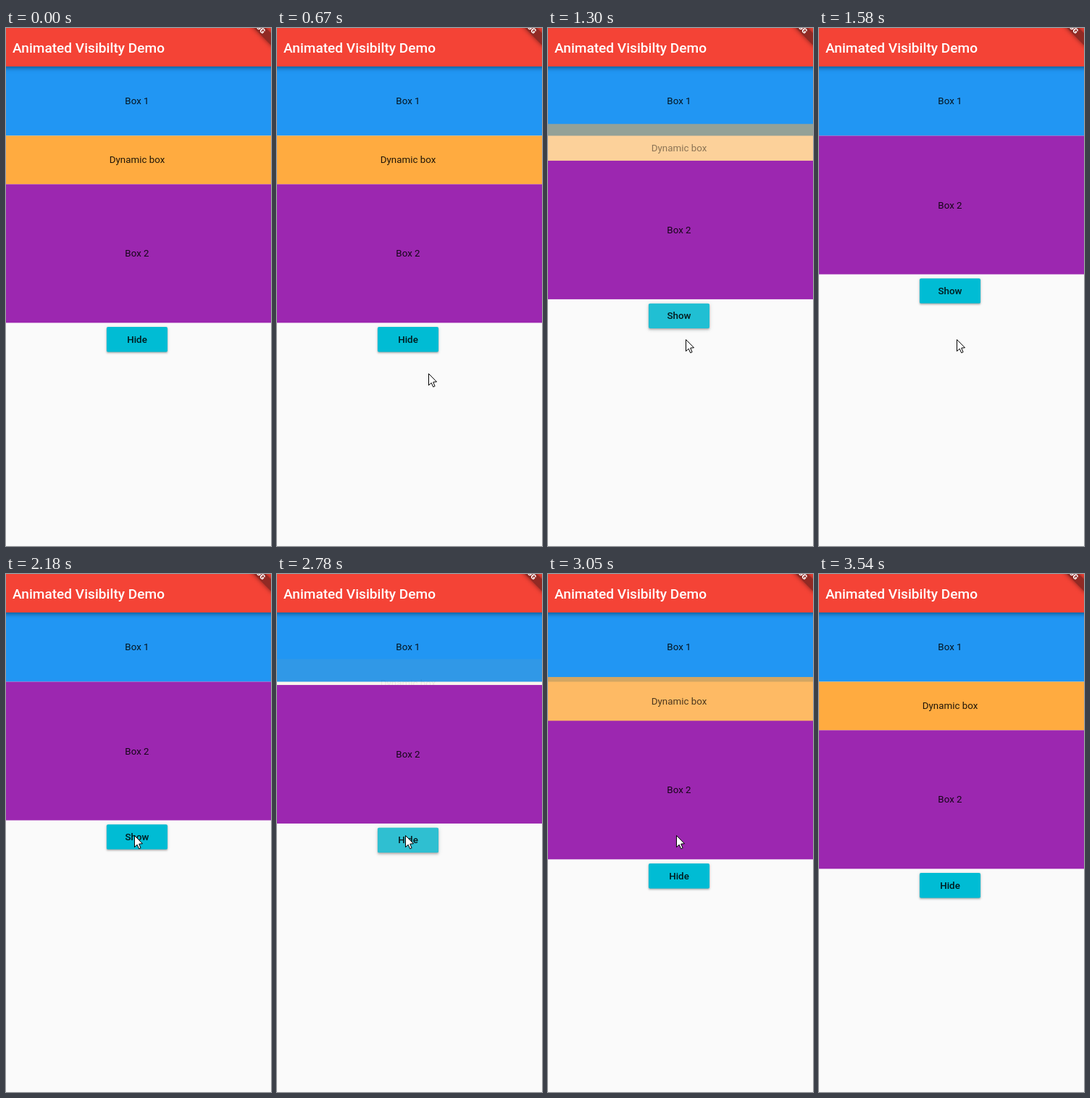
An HTML page with a canvas for the animation above (4600 ms loop, 366 by 714 pixels).

```html
<!DOCTYPE html>
<html lang="en">
<head>
<meta charset="utf-8">
<title>Animated Visibilty Demo</title>
<style>
  html, body { margin: 0; width: 100%; height: 100%; overflow: hidden; background: #fafafa; }
  canvas { display: block; width: 366px; height: 714px; }
</style>
</head>
<body>
<canvas id="stage"></canvas>
<script>
const W = 366, H = 714, LOOP = 4600;
const S = 0.955;             // stage pixels per layout unit
const CX = 181;
const BAR = 53, BLUE = 100 * S, DYN = 70 * S, PURPLE = 200 * S;
const INK = 'rgba(0,0,0,0.87)';

const HIDE = { press: 1020, start: 1089, time: 430, x: 189.5, y: 18 };
const SHOW = { press: 2550, start: 2702, time: 495, x: 177.5, y: 16 };

// The picture refreshes about every 70 ms within these spans and rests between them.
const BURSTS = [[260, 740], [810, 1300], [1370, 1580], [1980, 2180], [2650, 3120], [3190, 3540]];

// Pointer glides: start, end, and where it arrives
const ENTRY = { x: 316, y: 695 };
const GLIDES = [
  { from: 200, to: 780, x: 199, y: 456 },
  { from: 740, to: 900, x: 190, y: 429 },
  { from: 1910, to: 2180, x: 177, y: 360 },
  { from: 3120, to: 3500, x: 240, y: 690 },
];

const canvas = document.getElementById('stage');
const ctx = canvas.getContext('2d');
const dpr = window.devicePixelRatio || 1;
canvas.width = W * dpr;
canvas.height = H * dpr;

const clamp = u => Math.min(1, Math.max(0, u));
const ramp = (t, start, time) => (1 - Math.cos(Math.PI * clamp((t - start) / time))) / 2;

function refreshTime(t) {
  const slack = 5;
  const burst = BURSTS.findLast(([a]) => a <= t + slack);
  if (!burst) return 0;
  const [a, b] = burst;
  const steps = Math.round((b - a) / 70);
  const step = (b - a) / steps;
  return a + step * Math.min(steps, Math.floor((t - a + slack) / step));
}

function rect(x, y, w, h, color) {
  ctx.fillStyle = color;
  ctx.fillRect(x, y, w, h);
}

function text(str, x, cy, size, weight, color, align = 'center') {
  ctx.font = `${weight} ${size * S}px Roboto, sans-serif`;
  ctx.textAlign = align;
  ctx.fillStyle = color;
  ctx.fillText(str, x, cy + size * S * 0.342);
}

function shadow(x, y, w, h, e) {
  const layers = [[e / 2, e, -e / 4, 0.2], [e, e * 1.25, 0, 0.14], [e / 4, e * 2.5, 0, 0.12]];
  for (const [dy, blur, spread, alpha] of layers) {
    const g = spread * S;
    ctx.filter = `blur(${blur * S * dpr / 2}px)`;
    rect(x - g, y + dy * S - g, w + 2 * g, h + 2 * g, `rgba(0,0,0,${alpha})`);
  }
  ctx.filter = 'none';
}

function drawBar() {
  shadow(-40, -40, W + 80, BAR + 40, 4);
  rect(0, 0, W, BAR, '#f44336');
  text('Animated Visibilty Demo', 9, 27, 20, 500, '#fff', 'left');
}

function drawBanner() {
  const y = 28 * S, h = 12 * S, half = 40 * S;
  ctx.save();
  ctx.translate(368.5, -28);
  ctx.rotate(Math.PI / 4);
  ctx.filter = `blur(${3 * dpr}px)`;
  rect(-half, y, 2 * half, h, 'rgba(0,0,0,0.5)');
  ctx.filter = 'none';
  rect(-half, y, 2 * half, h, 'rgb(145,42,36)');
  text('DEBUG', 0, y + h / 2, 10.2, 900, '#fff');
  ctx.restore();
}

function drawButton(top, t) {
  const w = 88 * S, h = 36 * S, x = CX - w / 2;
  const tap = t < SHOW.press ? HIDE : SHOW;
  const age = Math.max(0, t - tap.press);
  const radius = 18 * (age / 140) ** 2;
  const alpha = age ? 0.4 * clamp(1 - (age - 140) / 230) : 0;

  shadow(x, top, w, h, 2 + 3 * alpha);
  ctx.save();
  ctx.beginPath();
  ctx.roundRect(x, top, w, h, 2 * S);
  ctx.fillStyle = '#00bcd4';
  ctx.fill();
  if (alpha > 0) {
    ctx.clip();
    ctx.beginPath();
    ctx.arc(tap.x, top + tap.y, radius, 0, 2 * Math.PI);
    ctx.fillStyle = `rgba(200,200,200,${alpha})`;
    ctx.fill();
  }
  ctx.restore();
  const label = t >= HIDE.start && t < SHOW.start ? 'Show' : 'Hide';
  text(label, CX, top + h / 2, 14, 500, INK);
}

function drawPointer(t) {
  if (t < 260 || t >= 3540) return;
  let { x, y } = ENTRY;
  for (const g of GLIDES) {
    const u = ramp(t, g.from, g.to - g.from);
    x += (g.x - x) * u;
    y += (g.y - y) * u;
  }
  const outline = [[0, 0], [0, 16], [3.7, 12.6], [6.2, 18.2], [8.6, 17.2], [6.2, 11.6], [11, 11.2]];
  ctx.beginPath();
  for (const [dx, dy] of outline) ctx.lineTo(Math.round(x) + 0.5 + dx, Math.round(y) + 0.5 + dy);
  ctx.closePath();
  ctx.fillStyle = '#fff';
  ctx.fill();
  ctx.strokeStyle = '#000';
  ctx.lineWidth = 1;
  ctx.stroke();
}

function draw(t) {
  const shown = 1 - ramp(t, HIDE.start, HIDE.time) + ramp(t, SHOW.start, SHOW.time);
  const dynTop = BAR + BLUE;
  const purpleTop = dynTop + DYN * shown;
  ctx.setTransform(dpr, 0, 0, dpr, 0, 0);
  rect(0, 0, W, H, '#fafafa');

  rect(0, BAR, W, BLUE, '#2196f3');
  text('Box 1', CX, BAR + BLUE / 2, 14, 400, INK);

  // The full-height box stays centred in its shrinking slot and overlaps upwards.
  const y = dynTop - DYN * (1 - shown) / 2;
  ctx.globalAlpha = shown;
  rect(0, y, W, DYN, '#ffab40');
  text('Dynamic box', CX, y + DYN / 2, 14, 400, INK);
  ctx.globalAlpha = 1;

  rect(0, purpleTop, W, PURPLE, '#9c27b0');
  text('Box 2', CX, purpleTop + PURPLE / 2, 14, 400, INK);

  drawButton(purpleTop + PURPLE + 6 * S, t);
  drawBar();
  drawBanner();
  drawPointer(t);
}

const start = performance.now();
function frame() {
  draw(refreshTime((performance.now() - start) % LOOP));
  requestAnimationFrame(frame);
}
frame();
</script>
</body>
</html>
```
